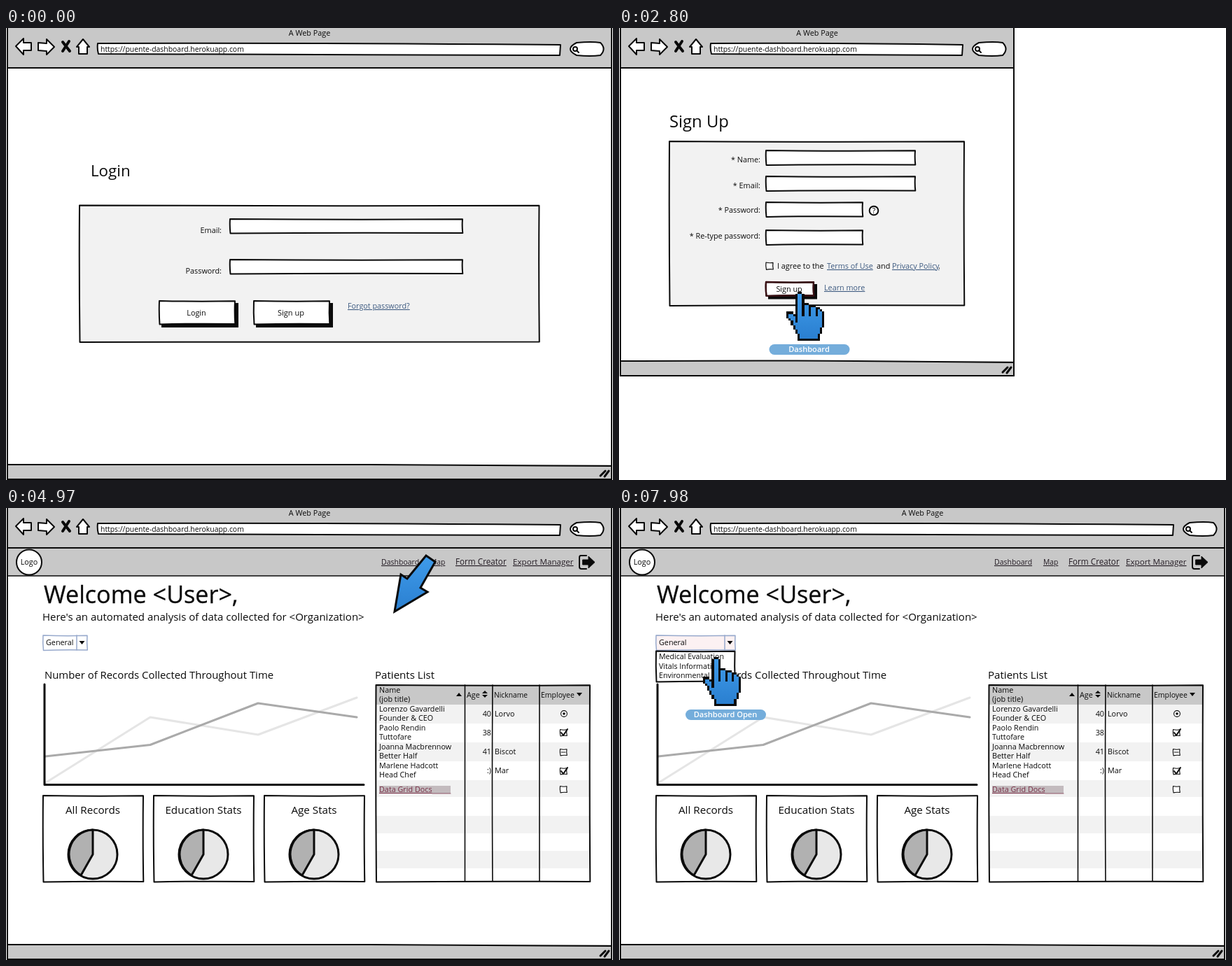
Recreate the animation shown at these times as an HTML page. Size 867x646 px, loop 8 s.

```html
<!DOCTYPE html>
<html lang="en">
<head>
<meta charset="utf-8">
<title>Dashboard wireframe walkthrough</title>
<style>
html, body { margin: 0; width: 100%; height: 100%; overflow: hidden; background: #fff; }
svg { display: block; width: 867px; height: 646px; font-family: "Open Sans", sans-serif; }
text { white-space: pre; }
</style>
</head>
<body>
<svg id="stage" viewBox="0 0 867 646"></svg>
<script>
const INK = '#0a0a0a', BAR = '#c8c8c8', PALE = '#f2f2f2', LINK = '#3d5a80';
const stage = document.getElementById('stage');

// Drawing helpers, each returning SVG markup
const text = (x, y, str, { size = 10.8, anchor = 'start', fill = INK, extra = '' } = {}) =>
  `<text x="${x}" y="${y}" font-size="${size}" text-anchor="${anchor}" fill="${fill}" ${extra}>` +
  str.replace(/&/g, '&amp;').replace(/</g, '&lt;') + '</text>';
const centered = (x, y, str, size) => text(x, y, str, { size, anchor: 'middle' });
const right = (x, y, str) => text(x, y, str, { anchor: 'end' });
const link = (x, y, str, fill = LINK, size = 10.8) =>
  text(x, y, str, { fill, size, extra: 'text-decoration="underline"' });
const path = (d, { fill = 'none', stroke = INK, width = 2, extra = '' } = {}) =>
  `<path d="${d}" fill="${fill}" stroke="${stroke}" stroke-width="${width}" stroke-linejoin="round" stroke-linecap="round" ${extra}/>`;
const solid = (d, fill = INK) => path(d, { fill, stroke: 'none' });
const rect = (x, y, w, h, fill) => `<rect x="${x}" y="${y}" width="${w}" height="${h}" fill="${fill}"/>`;
const circle = (x, y, r, fill = '#fff', width = 2) =>
  `<circle cx="${x}" cy="${y}" r="${r}" fill="${fill}" stroke="${INK}" stroke-width="${width}"/>`;

// Rectangle with slightly bowed, hand-drawn sides
const box = (l, t, r, b, fill = '#fff', options = {}) => {
  const cx = (l + r) / 2, cy = (t + b) / 2;
  return path(`M${l} ${t}Q${cx} ${t + 1.3} ${r} ${t + .3}Q${r - .8} ${cy} ${r + .3} ${b}` +
    `Q${cx} ${b - .8} ${l + .5} ${b + .4}Q${l - .7} ${cy} ${l} ${t}Z`, { fill, ...options });
};
const button = (l, t, r, b, label, size) =>
  `<g stroke-linejoin="round">${rect(l + 3, t + 3, r - l + 2, b - t + 2, INK)}${box(l, t, r, b)}</g>` +
  centered((l + r) / 2 - 1, (t + b) / 2 + 4, label, size);

function browser(w, h) {
  return rect(0, 0, w - 1, h, '#fff') + rect(1, 0, w - 3, 57, BAR) + rect(2, h - 22, w - 4, 21, BAR) +
    path(`M2 57Q${w / 3} 56 ${w - 2} 57M2 0Q1 ${h / 2} 2 ${h - 1}M${w - 2} 0Q${w - 3} ${h / 3} ${w - 2} ${h - 1}`) +
    path(`M2 ${h - 22}Q${w * .4} ${h - 23} ${w * .6} ${h - 22}T${w - 2} ${h - 20}M2 ${h - 1}H${w - 2}`) +
    centered(w / 2, 11, 'A Web Page') +
    path('M14 26L25 15V21H36V32H25V38ZM69 27L58 16V22L46 21V32L58 33V38Z', { fill: '#fff' }) +
    path('M81 20L91 33M90 19L81 33', { width: 4 }) +
    path('M110 16L119 27H116V37H104V27H101Z', { fill: '#fff' }) +
    path(`M131 22Q${w / 2} 21 ${w - 75} 24L${w - 76} 39Q${w / 2} 38 132 37Q130 30 131 22Z`, { fill: '#fff' }) +
    text(135, 34, 'https://puente-dashboard.herokuapp.com', { size: 10.4 }) +
    path(`M${w - 52} 21Q${w - 30} 19 ${w - 18} 21Q${w - 9} 30 ${w - 18} 39Q${w - 32} 41 ${w - 52} 39Q${w - 70} 30 ${w - 52} 21Z`, { fill: '#fff' }) +
    circle(w - 54, 30, 3) + path(`M${w - 52} 32l3 3`) +
    path(`M${w - 18} ${h - 6}L${w - 11} ${h - 13}M${w - 12} ${h - 5}L${w - 6} ${h - 13}`, { width: 3 });
}

function loginPage() {
  return browser(867, 646) + text(121, 212, 'Login', { size: 22.3 }) +
    box(105, 253.5, 761.5, 448.5, PALE) +
    right(308, 293, 'Email:') + box(320, 273, 652, 293) +
    right(308, 351, 'Password:') + box(320, 331, 652, 351) +
    button(219, 390, 327, 423, 'Login') + button(354, 390, 462, 423, 'Sign up', 11) +
    link(488, 401, 'Forgot password?');
}

function signupPage() {
  const fields = [['Name', 175, 423], ['Email', 212, 423], ['Password', 249, 348], ['Re-type password', 289, 348]];
  return browser(566, 498) + text(72, 142, 'Sign Up', { size: 23.8 }) +
    box(72, 162, 493, 396.5, PALE) +
    fields.map(([label, y, end], i) =>
      right(202, y + (i === 3 ? 12 : i === 2 ? 15 : 17), `* ${label}:`) + box(210, y, end, y + 20.5)).join('') +
    circle(364, 261, 6.3) + centered(364, 265, '?') +
    box(210, 335, 220, 345, '#fff', { width: 1.2 }) +
    text(226, 344, 'I agree to the') + link(297, 344, 'Terms of Use') +
    text(368, 344, 'and') + link(390, 344, 'Privacy Policy') + text(456, 344, '.') +
    button(210, 363, 278, 382.5, 'Sign up') +
    `<g id="pressed">${box(210, 363, 278, 382.5, 'none', { stroke: '#3a1014', width: 2.4 })}</g>` +
    link(293, 375, 'Learn more');
}

function checkbox(y, mark) {
  const marks = { check: 'M793 321l3 4 6 -9', minus: 'M793 321h6', none: '' };
  return `<g transform="translate(0 ${y - 321})">` + box(791.5, 316.5, 801, 325.5, '#fff', { width: 1.1 }) +
    path(marks[mark], { width: mark === 'check' ? 2 : 1.2 }) + '</g>';
}

function patientTable() {
  const people = [
    ['Lorenzo Gavardelli', 'Founder & CEO', '40', 'Lorvo'],
    ['Paolo Rendin', 'Tuttofare', '38', ''],
    ['Joanna Macbrennow', 'Better Half', '41', 'Biscot'],
    ['Marlene Hadcott', 'Head Chef', ':)', 'Mar']
  ];
  const stripes = [[281, 27], [335, 27], [389, 24], [440, 25], [490, 25]];
  return text(527, 244, 'Patients List', { size: 15.1 }) +
    rect(529, 253, 305, 28, BAR) + stripes.map(([y, h]) => rect(529, y, 305, h, PALE)).join('') +
    box(528.5, 253, 834, 534, 'none') +
    path('M655.5 253V533M695 253Q694 390 695 533M762 253V533', { width: 1.6 }) +
    text(533, 264, 'Name') + text(533, 277, '(job title)') + text(658, 271, 'Age') +
    text(697, 271, 'Nickname', { size: 10.3 }) + text(764, 271, 'Employee', { size: 10.5 }) +
    solid('M643 269h8l-4 -5ZM680 265h8l-4 -4ZM680 267h8l-4 4ZM815 264h8l-4 5Z') +
    people.map(([name, job, age, nick], i) => {
      const y = 291 + 27 * i;
      return text(533, y, name) + text(533, y + 13, job) + right(693, y + 7, age) + text(698, y + 7, nick);
    }).join('') +
    circle(797, 294, 4.4, '#fff', 1.1) + circle(797, 294, 1.8, INK, 0) +
    checkbox(321, 'check') + checkbox(349, 'minus') + checkbox(376, 'check') + checkbox(402, 'none') +
    rect(533, 397, 102, 11, '#c3bbbe') + link(533, 406, 'Data Grid Docs', '#783047') +
    path('M609 408H635', { stroke: '#783047', width: .8 });
}

function statCard(x, title) {
  const c = x + 71;
  return box(x, 411, x + 143, 534) + centered(c, 437, title, 15.2) +
    circle(c, 495, 35, '#e8e8e8', 3) +
    path(`M${c} 495V460A35 35 0 0 0 ${c - 17} 525Z`, { fill: '#b1b1b1', width: 3 });
}

function dropdown(end, fill) {
  return box(53, 182, end, 203, fill, { stroke: '#97a9cc', width: 1.5 }) +
    path(`M${end - 15} 182V203`, { stroke: '#97a9cc', width: 1.5 }) +
    text(57, 196, 'General') + solid(`M${end - 11.5} 190h8l-4 5Z`);
}

function dashboardPage() {
  return browser(867, 646) +
    rect(3, 58, 861, 39, BAR) + path('M2 97Q500 96 865 97', { width: 1.7 }) +
    circle(33, 77.5, 18) + centered(33, 81, 'Logo') +
    link(536, 81, 'Dashboard', '#241c24', 10.5) + link(606, 81, 'Map', '#241c24', 10.3) +
    link(642, 81, 'Form Creator', '#241c24', 11.7) + link(724, 81, 'Export Manager', '#241c24', 11.6) +
    path('M829 68H821Q819 68 819 71V84Q819 87 822 87H829') +
    path('M824 74H832V69L841 77.5L832 86V81H824Z', { fill: INK, width: 1 }) +
    text(54, 136, 'Welcome <User>,', { size: 34.2, extra: 'stroke="#0a0a0a" stroke-width=".3"' }) +
    text(52, 161, "Here's an automated analysis of data collected for <Organization>", { size: 15 }) +
    text(55, 244, 'Number of Records Collected Throughout Time', { size: 14.9 }) +
    path('M56 393L206 299L360 324L501 271', { stroke: '#e5e5e5', width: 3 }) +
    path('M56 355L206 338.500L360 279L501 299', { stroke: '#aaa', width: 3 }) +
    path('M55 252V395.500H511', { width: 3 }) +
    statCard(53, 'All Records') + statCard(211, 'Education Stats') + statCard(369, 'Age Stats') +
    patientTable() +
    `<g id="menuClosed">${dropdown(116, '#fff')}</g>` +
    `<g id="menuOpen">${dropdown(166, '#fcf1f2')}${box(53, 204.500, 165.500, 248)}` +
    ['Medical Evaluation', 'Vitals Information', 'Environmental']
      .map((item, i) => text(57, 216 + 13.5 * i, item, { size: 10.65 })).join('') + '</g>';
}

// Both pointers have their tip at 0,0
const hand = '<g transform="translate(-17.5 0) scale(3.2)" shape-rendering="crispEdges">' +
  solid('M5 0H7V1H8V5H10V6H13V7H15V8H16V9H17V16H16V19H15V22H5V19H4V17H3V15H2V13H1V12H0V9H3V10H4V1H5Z') +
  solid('M5 1H7V6H10V7H13V8H15V9H16V16H15V19H14V21H6V19H5V17H4V15H3V13H2V12H1V10H3V11H5V1Z', 'url(#blue)') +
  solid('M7 5h1v6h-1ZM10 6h1v5h-1ZM13 7h1v4h-1ZM4 9h1v5h-1Z') + '</g>' +
  '<rect x="-42" y="75.500" width="115" height="15" rx="7.500" fill="#74addb"/>' +
  text(15, 86.5, '', { size: 11.1, anchor: 'middle', fill: '#fff', extra: 'id="label" font-weight="600"' });
const arrow = path('M0 0L9 -53L18 -47L45 -80L58 -71L37 -34L47 -28Z',
  { fill: 'url(#blue)', width: 3, extra: 'style="stroke-linejoin:miter"' });

stage.innerHTML = '<defs><linearGradient id="blue" x2="0" y2="1">' +
  '<stop stop-color="#3f9bea"/><stop offset="1" stop-color="#2a7fd0"/></linearGradient></defs>' +
  `<g id="login">${loginPage()}</g><g id="signup">${signupPage()}</g><g id="dashboard">${dashboardPage()}</g>` +
  `<g id="pointer"><g id="hand">${hand}</g><g id="arrow">${arrow}</g></g>`;

const LOOP = 8000, SIGNUP_AT = 2310, DASHBOARD_AT = 4060, MENU_AT = 7280, POINTER_AT = 1050;
// Pointer tip over time: ms, x, y
const route = [
  [1050, 560, 330], [1600, 392.5, 406.5], [2310, 392.5, 406.5], [2700, 256.5, 376.5],
  [2950, 256.5, 376.5], [3650, 270, 365.5], [4060, 270, 365.5], [4850, 555, 148],
  [5150, 555, 148], [6250, 84, 190.5], [7200, 84, 190.5], [7850, 137, 212.5]
];
const hovers = [[1480, 2310, 'Sign up'], [2600, 4060, 'Dashboard'], [6130, 8000, 'Dashboard Open']];

const byId = id => document.getElementById(id);
const show = (id, visible) => { byId(id).style.display = visible ? '' : 'none'; };

function tipAt(t) {
  const i = route.findIndex(stop => stop[0] > t);
  if (i < 1) return (i ? route[route.length - 1] : route[0]).slice(1);
  const [t0, x0, y0] = route[i - 1], [t1, x1, y1] = route[i];
  const u = (t - t0) / (t1 - t0), ease = u * u * (3 - 2 * u);
  return [x0 + (x1 - x0) * ease, y0 + (y1 - y0) * ease];
}

function render(now) {
  const t = now % LOOP;
  show('login', t < SIGNUP_AT);
  show('signup', t >= SIGNUP_AT && t < DASHBOARD_AT);
  show('dashboard', t >= DASHBOARD_AT);
  show('pressed', t < 3300);
  show('menuClosed', t < MENU_AT);
  show('menuOpen', t >= MENU_AT);
  const hover = hovers.find(([from, to]) => t >= from && t < to);
  show('pointer', t >= POINTER_AT);
  show('hand', hover);
  show('arrow', !hover);
  byId('label').textContent = hover ? hover[2] : '';
  byId('pointer').setAttribute('transform', `translate(${tipAt(t)})`);
}

const start = performance.now();
function tick() {
  render(performance.now() - start);
  requestAnimationFrame(tick);
}
tick();
</script>
</body>
</html>
```
